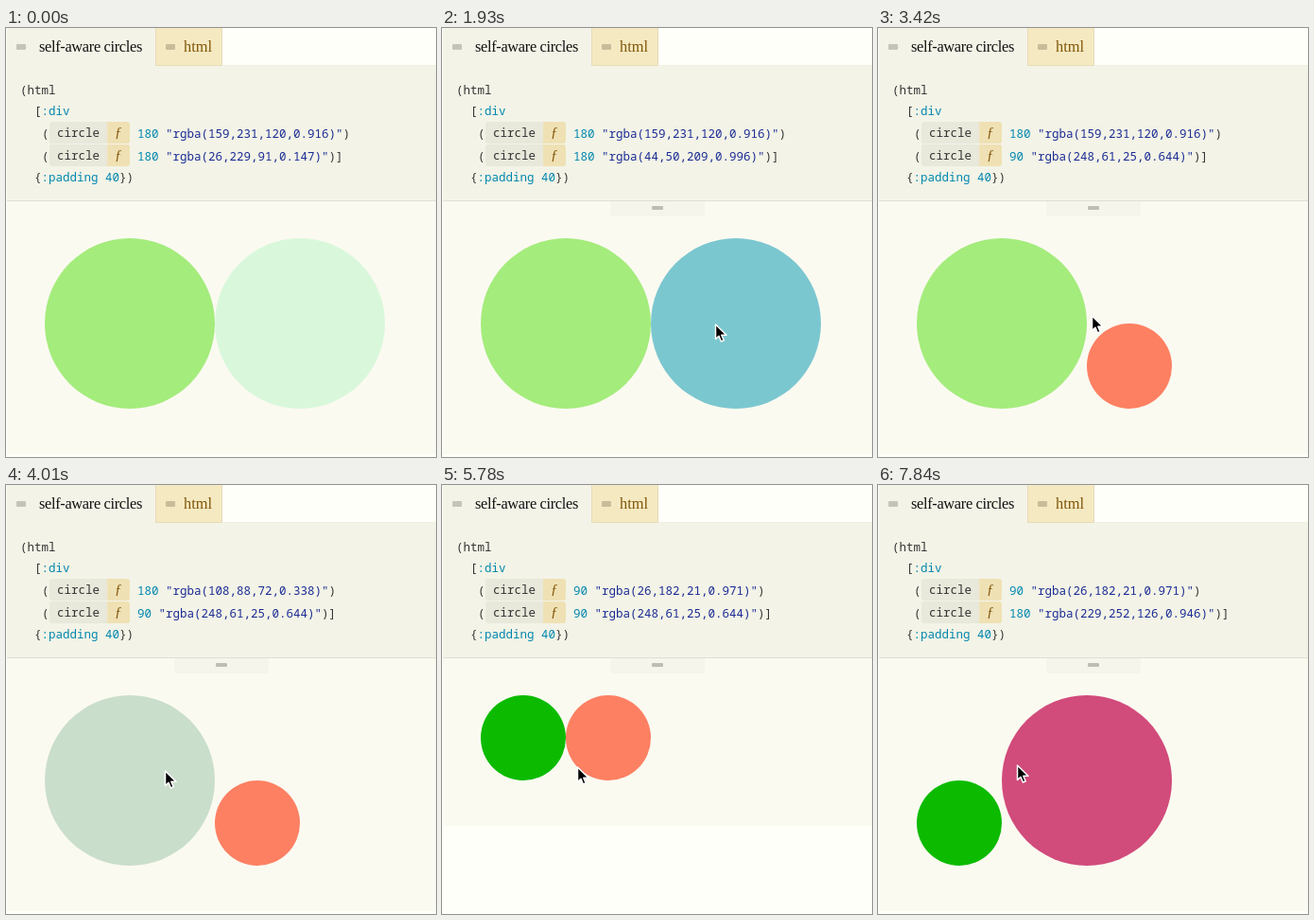
Animation, 455 px wide and 453 px high, one loop 7990 ms. Source, as an HTML page:

```html
<!DOCTYPE html>
<html lang="en">
<head>
<meta charset="utf-8">
<title>Self-aware circles</title>
<style>
  html, body { margin: 0; width: 100%; height: 100%; overflow: hidden; background: #fffff9; }
  svg { display: block; width: 455px; height: 453px; }
  text { white-space: pre; font: 500 12.5px "Noto Sans Mono", "DejaVu Sans Mono", monospace; fill: #333; }
  text.tab { font: 16.4px "Liberation Serif", "Noto Serif", serif; }
  text.fn { font: italic 15px "Liberation Serif", "Noto Serif", serif; fill: #80560a; }
  .key { fill: #0086ae; }
  .str { fill: #1b2c94; }
</style>
</head>
<body>
<svg viewBox="0 0 455 453">
  <defs>
    <g id="badge">
      <path d="M49 0H107V23H49a3 3 0 0 1-3-3V3a3 3 0 0 1 3-3z" fill="#e8e8db"/>
      <path d="M107 0H128a3 3 0 0 1 3 3V20a3 3 0 0 1-3 3H107z" fill="#efe1b4"/>
      <text x="54" y="16">circle</text>
      <text x="115" y="16" class="fn">ƒ</text>
      <text x="38" y="17">(</text>
    </g>
  </defs>

  <rect id="pane" x="1" y="183" width="454" fill="#fbfaf1"/>
  <g id="handle">
    <path d="M178 183H278V196a3 3 0 0 1-3 3H181a3 3 0 0 1-3-3z" fill="#f5f5ec"/>
    <rect x="222" y="188" width="12" height="4" rx="1" fill="#bdbdb1"/>
  </g>
  <circle id="left"/>
  <circle id="right"/>

  <path d="M1 0H158V40H455V182H1z" fill="#f3f3e7"/>
  <path d="M1 182.5H455" stroke="#dfdfd3"/>
  <path d="M229 39.5H455" stroke="#f0f0e6"/>
  <rect x="158" width="70" height="40" fill="#f5e9c2"/>
  <path d="M158.5 0V39.5H228.5V0" fill="none" stroke="#e6dbb6"/>
  <rect x="11" y="17" width="10" height="6" rx="1" fill="#c3c5b8"/>
  <rect x="169" y="17" width="10" height="6" rx="1" fill="#c8bd9b"/>
  <text class="tab" x="35" y="25" letter-spacing="-.34" style="fill:#111">self-aware circles</text>
  <text class="tab" x="188" y="25" style="fill:#80560a">html</text>

  <text x="15" y="70">(html</text>
  <text x="30" y="92">[<tspan class="key">:div</tspan></text>
  <use href="#badge" y="99"/>
  <use href="#badge" y="123"/>
  <text id="line1" x="139" y="116"><tspan class="key"></tspan> <tspan class="str"></tspan>)</text>
  <text id="line2" x="139" y="140"><tspan class="key"></tspan> <tspan class="str"></tspan>)]</text>
  <text x="30" y="162">{<tspan class="key">:padding 40</tspan>})</text>

  <path id="cursor" d="M.5 0V15.5L4 12.2 6.4 18 9.2 16.8 6.8 11.2H12z"
        fill="#000" stroke="#fff" stroke-width="1.5" stroke-linejoin="round"/>
</svg>
<script>
  const LOOP = 7990, START = 890, STEP = 147.8;
  const $ = id => document.getElementById(id);

  // Clicks: step, size, colour in the code, colour on the page
  const leftClicks = [
    [-9, 180, "159,231,120,0.916", [164, 236, 124]],
    [19, 180, "85,154,115,0.302", [202, 222, 204]],
    [21, 180, "108,88,72,0.338", [203, 196, 183]],
    [23, 180, "201,147,236,0.582", [222, 188, 238]],
    [24, 180, "26,182,21,0.971", [12, 187, 0]],
    [28, 90, "26,182,21,0.971", [12, 187, 0]]
  ];
  const rightClicks = [
    [-9, 180, "26,229,91,0.147", [217, 248, 219]],
    [4, 180, "37,165,185,0.602", [123, 199, 208]],
    [7, 180, "44,50,209,0.996", [40, 44, 210]],
    [9, 180, "248,61,25,0.644", [253, 128, 98]],
    [12, 90, "248,61,25,0.644", [253, 128, 98]],
    [35, 90, "187,142,214,0.731", [206, 170, 222]],
    [37, 90, "245,20,67,0.977", [251, 14, 66]],
    [42, 180, "245,20,67,0.977", [251, 14, 66]],
    [46.4, 180, "118,190,244,0.983", [111, 217, 255]],
    [47, 180, "229,252,126,0.946", [231, 253, 130]]
  ];
  // Pointer: step, x, y
  const path = [
    [0, 318, 440], [4, 292, 322], [7, 289, 313], [9, 280, 304], [15, 280, 304],
    [19, 172, 304], [21, 168, 302], [23, 150, 305], [32, 150, 305], [33, 143, 298],
    [36, 175, 275], [40, 175, 275], [41, 177, 272], [42, 177, 272], [44, 147, 296], [48, 147, 296]
  ];

  const mix = (a, b, p) => a + (b - a) * p;
  const clamp = v => Math.min(1, Math.max(0, v));

  // Each click eases the circle to its new look over two steps.
  function look(clicks, k) {
    let [, size, code, rgb] = clicks[0], d = size;
    for (const [at, s, c, col] of clicks) {
      if (at > k) break;
      const p = clamp((k - at) / 2);
      d = mix(d, s, p);
      rgb = rgb.map((v, i) => mix(v, col[i], p));
      size = s;
      code = c;
    }
    return { d, rgb, size, code };
  }

  function pointer(k) {
    const i = Math.max(1, path.findIndex(p => p[0] >= k));
    const [a, b] = [path[i - 1], path[i]], p = (k - a[0]) / (b[0] - a[0]);
    return [mix(a[1], b[1], p), mix(a[2], b[2], p)];
  }

  function place(id, c, x, base) {
    const el = $(id), r = c.d / 2;
    el.setAttribute("cx", x + r);
    el.setAttribute("cy", base - r);
    el.setAttribute("r", r);
    el.setAttribute("fill", `rgb(${c.rgb.map(Math.round)})`);
  }

  function write(id, c) {
    const [num, str] = $(id).children;
    num.textContent = c.size;
    str.textContent = `"rgba(${c.code})"`;
  }

  function draw(k) {
    const a = look(leftClicks, k), b = look(rightClicks, k);
    const base = 222 + Math.max(a.d, b.d);
    place("left", a, 41, base);
    place("right", b, 41 + a.d, base);
    write("line1", a);
    write("line2", b);
    $("pane").setAttribute("height", base + 48 - 183);
    const shown = k < 0 ? "hidden" : "visible";
    $("handle").setAttribute("visibility", shown);
    $("cursor").setAttribute("visibility", shown);
    if (k >= 0) $("cursor").setAttribute("transform", `translate(${pointer(k)})`);
  }

  const t0 = performance.now();
  let last;
  function tick() {
    const t = (performance.now() - t0) % LOOP;
    const k = Math.max(-1, Math.floor((t - START) / STEP));
    if (k !== last) draw(last = k);
    requestAnimationFrame(tick);
  }
  tick();
</script>
</body>
</html>
```
